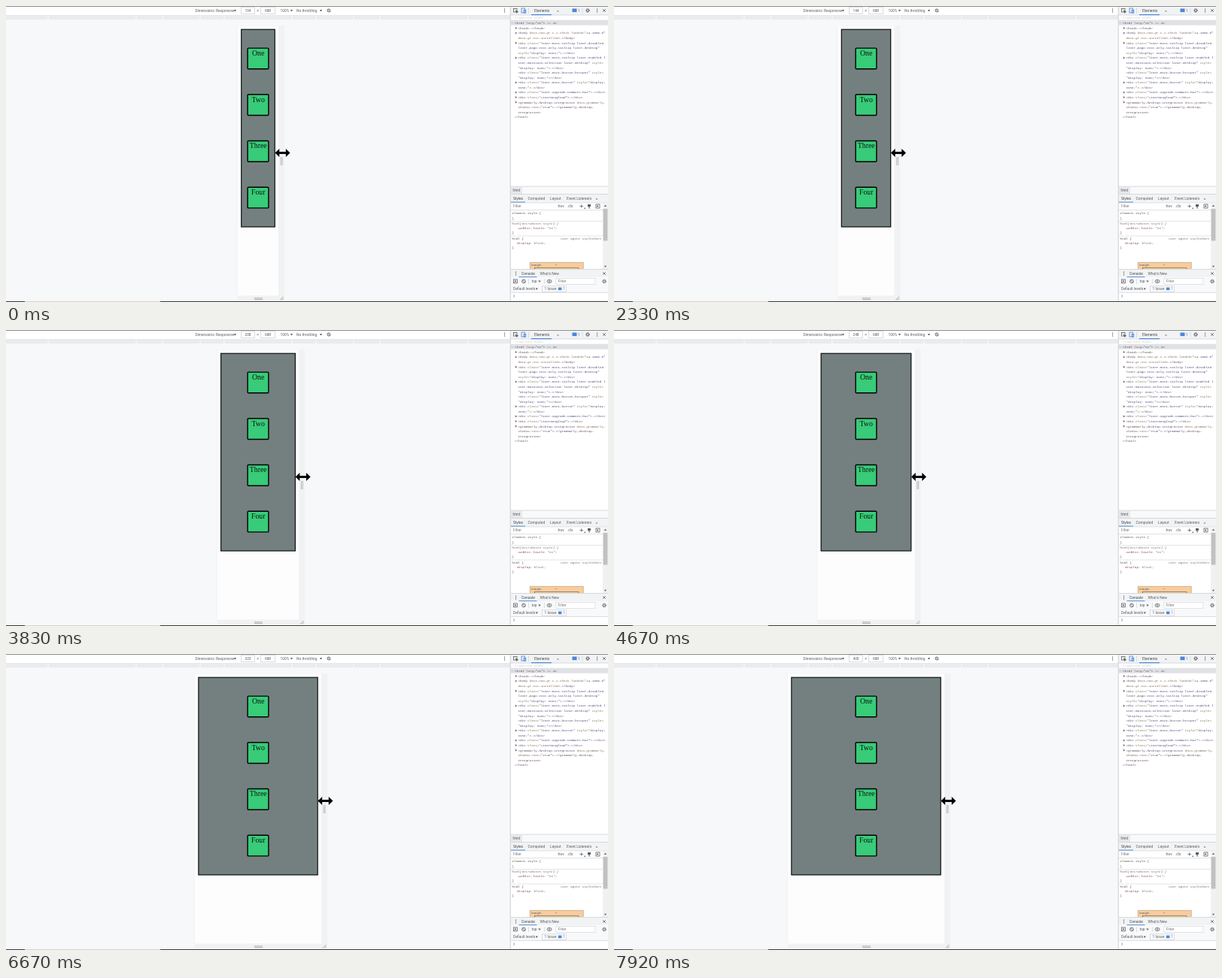
Write an HTML page with a canvas that moves like this. It is 800 by 394 pixels and loops after 8 s.

```html
<!DOCTYPE html>
<html lang="en">
<head>
<meta charset="utf-8">
<title>Responsive column</title>
<style>
html, body { margin: 0; width: 100%; height: 100%; overflow: hidden; background: #f7f8fa; }
canvas { display: block; width: 800px; height: 394px; }
</style>
</head>
<body>
<canvas id="stage" width="800" height="394"></canvas>
<script>
const LOOP = 8000, FPS = 12, SCALE = 0.52, CENTER = 335;
const MARGIN = 8 * SCALE;
const UI = 'Roboto, sans-serif', MONO = '"Liberation Mono", monospace';
const SERIF = '"Liberation Serif", serif';
const INK = '#5a5d61', BLUE = '#4a86dc', RULE = '#d0d3d6';
const TAG = '#62506a', ATTR = '#86705c', VALUE = '#50527e';

// Viewport width in CSS pixels over time, in ms
const WIDTHS = [
  [0, 104], [500, 107], [1000, 107], [1670, 122], [2330, 144], [2580, 146],
  [3420, 192], [3830, 208], [4250, 234], [5580, 280], [5920, 293],
  [6670, 323], [7580, 373], [7920, 400]
];

const MARKUP = [
  '<head>…</head>',
  '<body data-new-gr-c-s-check-loaded="14.1060.0"',
  'data-gr-ext-installed>…</body>',
  '<div class="liner-mini-tooltip liner-disabled',
  'liner-page-text-only-tooltip liner-desktop"',
  'style="display: none;">…</div>',
  '<div class="liner-mini-tooltip liner-enabled l',
  'iner-maintain-selection liner-desktop" style=',
  '"display: none;">…</div>',
  '<div class="liner-mini-button-hotspot" style=',
  '"display: none;"></div>',
  '<div class="liner-mini-button" style="display:',
  'none;">…</div>',
  '<div class="liner-upgrade-comment-box">…</div>',
  '<div class="LinerGoogleAd">…</div>',
  '<grammarly-desktop-integration data-grammarly-',
  'shadow-root="true">…</grammarly-desktop-',
  'integration>'
];

const canvas = document.getElementById('stage');
const chrome = document.createElement('canvas');
chrome.width = 800;
chrome.height = 394;
let c = chrome.getContext('2d');

function box(x, y, w, h, fill) {
  c.fillStyle = fill;
  c.fillRect(x, y, w, h);
}

function frame(x, y, w, h, color, width = 1) {
  c.strokeStyle = color;
  c.lineWidth = width;
  c.strokeRect(x, y, w, h);
}

function text(s, x, y, { color = INK, size = 4.9, font = UI, align = 'left', style = '' } = {}) {
  c.font = `${style} ${size}px ${font}`;
  c.fillStyle = color;
  c.textAlign = align;
  c.textBaseline = 'alphabetic';
  c.fillText(s, x, y);
}

function poly(points, fill) {
  c.beginPath();
  points.forEach(([x, y]) => c.lineTo(x, y));
  c.fillStyle = fill;
  c.fill();
}

function line(x1, y1, x2, y2, color = INK, width = 0.8) {
  c.strokeStyle = color;
  c.lineWidth = width;
  c.beginPath();
  c.moveTo(x1, y1);
  c.lineTo(x2, y2);
  c.stroke();
}

function ring(x, y, r, color = INK, width = 0.9) {
  c.strokeStyle = color;
  c.lineWidth = width;
  c.beginPath();
  c.arc(x, y, r, 0, Math.PI * 2);
  c.stroke();
}

const down = (x, y) => poly([[x - 1.6, y - 1.2], [x + 1.6, y - 1.2], [x, y + 1.4]], INK);
const right = (x, y) => poly([[x - 1, y - 1.6], [x + 1.4, y], [x - 1, y + 1.6]], '#6e6e6e');
const dots = (x, y) => [-2, 0, 2].forEach(d => box(x - 0.5, y + d - 0.5, 1.1, 1.1, INK));

function cross(x, y) {
  line(x - 1.8, y - 1.8, x + 1.8, y + 1.8);
  line(x - 1.8, y + 1.8, x + 1.8, y - 1.8);
}

function gear(x, y) {
  c.setLineDash([0.9, 0.7]);
  ring(x, y, 2.4, INK, 1);
  c.setLineDash([]);
  ring(x, y, 1.5);
}

function toolbar() {
  box(0, 0, 670, 12, '#fff');
  box(0, 12.5, 670, 5.5, '#e9ebef');
  box(0, 12, 670, 0.6, '#e0e2e5');
  for (const d of [45, 77, 127, 162, 279]) {
    box(CENTER - d - 0.5, 13, 1, 5, '#fbfcfd');
    box(CENTER + d - 0.5, 13, 1, 5, '#fbfcfd');
  }
  text('Dimensions: Responsive', 251.5, 8, { size: 4.8 });
  down(304.5, 6.2);
  frame(312.5, 1.5, 18, 9, RULE, 0.8);
  text('×', 334.5, 8, { align: 'center' });
  frame(338.5, 1.5, 19, 9, RULE, 0.8);
  text('688', 348, 8, { align: 'center' });
  text('100%', 364.5, 8);
  down(379.5, 6.2);
  text('No throttling', 386, 8);
  down(418.5, 6.2);
  ring(429, 6, 2);
  line(427, 4, 431, 8, INK, 0.7);
  dots(662.5, 6);
}

function markup() {
  const charWidth = 2.52;
  let inTag = false, inQuote = false, inAttr = false;
  MARKUP.forEach((row, i) => {
    const y = 30.9 + i * 6.58;
    if (row[0] === '<' && !row.includes('hotspot')) right(677.8, y - 1.5);
    [...row].forEach((ch, k) => {
      let color = '#555';
      if (ch === '<') { inTag = true; inAttr = false; }
      if (inTag) color = inAttr ? ATTR : TAG;
      if (inQuote) color = VALUE;
      if (ch === '"') inQuote = !inQuote;
      else if (ch === ' ' && !inQuote) inAttr = true;
      else if (ch === '>') { inTag = false; color = TAG; }
      text(ch, 680.5 + k * charWidth, y, { color, size: 4.3, font: MONO });
    });
    inAttr = inTag && (inAttr || row.endsWith('"'));
  });
}

function elementsPanel() {
  box(670, 0, 130, 394, '#fff');
  box(671, 0, 129, 12, '#f1f3f4');
  box(671, 11.6, 129, 0.8, RULE);
  frame(674.5, 3.5, 4.5, 4.5, INK, 0.8);
  poly([[676.5, 5.5], [681, 7.5], [678.5, 9.8]], INK);
  frame(685, 3, 4.5, 6, BLUE, 0.8);
  frame(688, 5.5, 2.8, 3.6, BLUE, 0.8);
  line(694.5, 2, 694.5, 10, RULE, 0.7);
  text('Elements', 702, 8, { color: '#444' });
  box(698, 11, 27, 1.2, BLUE);
  text('»', 732, 8, { size: 6 });
  box(752.5, 3.5, 6, 4.6, BLUE);
  text('1', 760, 8, { size: 4.5 });
  line(766, 2, 766, 10, RULE, 0.7);
  gear(773, 6);
  dots(785.5, 6);
  cross(795, 6);

  const code = { size: 4.3, font: MONO };
  text('<!DOCTYPE html>', 676, 17.3, { ...code, color: '#c8c8c8' });
  box(671, 18.6, 129, 7, '#dfe1e4');
  text('…', 671.5, 23, code);
  text('<html', 676, 23.8, { ...code, color: TAG });
  text('lang=', 691.1, 23.8, { ...code, color: ATTR });
  text('"en"', 703.7, 23.8, { ...code, color: VALUE });
  text('>', 713.8, 23.8, { ...code, color: TAG });
  text('== $0', 719, 23.8, { ...code, color: '#777', style: 'italic' });
  markup();
  text('</html>', 676, 149.3, { ...code, color: TAG });
}

function stylesPanel() {
  box(671, 240, 129, 10.5, '#f8f9fa');
  box(671, 239.7, 129, 0.8, RULE);
  box(671, 240.5, 15, 9.7, '#e6e8ea');
  text('html', 673.5, 247);
  box(671, 250.5, 129, 11, '#f1f3f4');
  box(671, 250.2, 129, 0.8, RULE);
  text('Styles', 674, 258, { color: '#444' });
  box(671, 260.6, 19, 1.2, BLUE);
  text('Computed', 693.5, 258);
  text('Layout', 723, 258);
  text('Event Listeners', 745, 258);
  text('»', 783.5, 258, { size: 6 });
  box(671, 261.6, 129, 0.7, RULE);
  text('Filter', 674, 268.3, { color: '#777' });
  text(':hov', 732.5, 268.3);
  text('.cls', 746, 268.3);
  line(762.5, 266.5, 767, 266.5);
  line(764.8, 264.3, 764.8, 268.8);
  poly([[768, 270], [770, 268], [770, 270]], INK);
  box(773, 264, 4, 3, INK);
  line(775, 266, 775, 269.5, INK, 1.2);
  frame(784, 264, 5, 5, INK, 0.8);
  poly([[784.8, 266.5], [787, 264.9], [787, 268]], INK);
  box(671, 271.4, 122, 0.7, RULE);

  const code = { size: 4.3, font: MONO, color: '#555' };
  const italic = { ...code, style: 'italic', color: '#707070' };
  const prop = { ...italic, color: '#8a4a4a' };
  text('element.style {', 672.5, 277.3, code);
  text('}', 672.5, 283.5, code);
  box(671, 286, 122, 0.6, RULE);
  text('html[attributes style] {', 672.5, 291.2, italic);
  text('-webkit-locale', 679, 297.2, prop);
  text(': "en";', 714.3, 297.2, italic);
  text('}', 672.5, 303.4, code);
  box(671, 305.7, 122, 0.6, RULE);
  text('html {', 672.5, 311.2, code);
  text('user agent stylesheet', 791.5, 311.2, { ...italic, align: 'right' });
  text('display', 679, 317.3, prop);
  text(': block;', 696.6, 317.3, italic);
  text('}', 672.5, 323.4, code);

  box(696, 341, 71.5, 9.5, '#f9cc9d');
  c.setLineDash([1, 1]);
  frame(696.3, 341.3, 71, 12, '#8a7a68', 0.7);
  c.setLineDash([]);
  text('margin', 698, 346.4, { size: 4.3 });
  text('–', 731, 346.3, { align: 'center' });
  frame(702.5, 348.8, 58.5, 4, '#555', 0.8);
  box(703, 349.2, 57.5, 1.3, '#fddd9b');

  box(793, 262, 7, 88, '#f1f1f1');
  box(793.6, 270, 5.8, 42.5, '#c1c1c1');
  poly([[794.8, 267], [798.2, 267], [796.5, 264.8]], '#666');
  poly([[794.8, 345.8], [798.2, 345.8], [796.5, 348]], '#666');
}

function consolePanel() {
  box(671, 350.5, 129, 43, '#fff');
  box(671, 350.5, 129, 10.5, '#f1f3f4');
  box(671, 350, 129, 0.8, RULE);
  dots(677.5, 356);
  text('Console', 685, 358, { color: '#444' });
  box(681.5, 360.2, 24, 1.2, BLUE);
  text("What's New", 709.5, 358);
  cross(795, 356);
  box(671, 361.4, 129, 10.4, '#f8f9fa');
  frame(674.5, 364, 4.8, 4.8, INK, 0.8);
  poly([[676, 365], [678.4, 366.4], [676, 367.8]], INK);
  ring(688, 366.5, 2.3);
  line(686.4, 364.9, 689.6, 368.1);
  line(694.5, 363, 694.5, 370, RULE, 0.7);
  text('top', 698.5, 368.3);
  down(709, 366.6);
  line(715.5, 363, 715.5, 370, RULE, 0.7);
  c.beginPath();
  c.ellipse(722, 366.5, 3, 2.1, 0, 0, Math.PI * 2);
  c.lineWidth = 0.8;
  c.strokeStyle = INK;
  c.stroke();
  ring(722, 366.5, 0.7);
  box(731, 362.5, 52, 8, '#fff');
  frame(731, 362.5, 52, 8, RULE, 0.6);
  text('Filter', 733.5, 368.3, { color: '#777' });
  gear(795, 366.5);
  box(671, 371.6, 129, 10, '#f8f9fa');
  text('Default levels', 674, 378.3);
  down(705.3, 376.7);
  frame(712.5, 372.7, 32, 7.6, RULE, 0.7);
  text('1 Issue:', 715.5, 378.3);
  box(734, 374.6, 4.4, 3.6, BLUE);
  text('1', 740, 378.3, { color: BLUE });
  box(671, 381.3, 129, 0.7, RULE);
  line(674.2, 384.5, 676, 386.2, BLUE);
  line(676, 386.2, 674.2, 387.9, BLUE);
}

function drawChrome() {
  box(0, 0, 800, 394, '#f7f8fa');
  toolbar();
  elementsPanel();
  stylesPanel();
  consolePanel();
  box(669.8, 0, 0.9, 393, '#c6c9cc');
  box(0, 0, 800, 1, '#8c8e90');
  box(0, 393, 800, 1, '#3a3839');
  box(25, 393, 180, 1, '#d8cfc8');
}

function widthAt(t) {
  const i = Math.max(1, WIDTHS.findIndex(([at]) => at >= t));
  const [t0, a] = WIDTHS[i - 1], [t1, b] = WIDTHS[i];
  return a + (b - a) * (t - t0) / (t1 - t0);
}

function resizeCursor(x, y) {
  poly([
    [x - 10, y], [x - 4.3, y - 5.6], [x - 4.3, y - 1.5], [x + 4.3, y - 1.5], [x + 4.3, y - 5.6],
    [x + 10, y], [x + 4.3, y + 5.6], [x + 4.3, y + 1.5], [x - 4.3, y + 1.5], [x - 4.3, y + 5.6]
  ], '#000');
}

function card(label, y) {
  c.beginPath();
  c.roundRect(CENTER - 13.9, y + 0.7, 27.8, 27.7, 1);
  c.fillStyle = '#38cb78';
  c.fill();
  c.strokeStyle = '#000';
  c.lineWidth = 1.4;
  c.stroke();
  text(label, CENTER + 0.2, y + 10.5, { size: 9.8, font: SERIF, color: '#0a1a10', align: 'center' });
}

function viewport(width) {
  const half = width * SCALE / 2;
  const left = CENTER - half, edge = CENTER + half;
  text(String(Math.round(width)), 321.5, 8, { align: 'center' });

  box(left - 2, 26.5, 2, 359, '#f4f5f7');
  box(left, 26.5, half * 2 + 8, 365.5, '#f1f2f4');
  box(left, 26.5, half * 2, 359, '#fefdfe');
  box(330, 388.4, 11, 0.9, '#a4a6a8');
  box(330, 390.3, 11, 0.9, '#a4a6a8');
  box(edge + 2.8, 201, 0.9, 11, '#b0b2b4');
  box(edge + 4.6, 201, 0.9, 11, '#b0b2b4');
  line(edge + 2, 391.5, edge + 6.5, 387, '#8c8e90', 0.8);
  line(edge + 4.5, 391.5, edge + 6.5, 389.5, '#8c8e90', 0.8);

  const x = left + MARGIN, w = 2 * (half - MARGIN);
  box(x, 30.6, w, 264, '#0b0f0f');
  box(x + 1.2, 31.8, w - 2.4, 261.6, '#748080');
  ['One', 'Two', 'Three', 'Four'].forEach((label, i) => card(label, 55.4 + i * 61.7));
  resizeCursor(edge + 5.5, 195.5);
}

function render(now) {
  const step = Math.floor((now % LOOP) * FPS / 1000 + 0.05) % (LOOP * FPS / 1000);
  c.drawImage(chrome, 0, 0);
  viewport(widthAt(Math.min(step * 1000 / FPS, 7920)));
  requestAnimationFrame(render);
}

drawChrome();
c = canvas.getContext('2d');
requestAnimationFrame(render);
</script>
</body>
</html>
```
